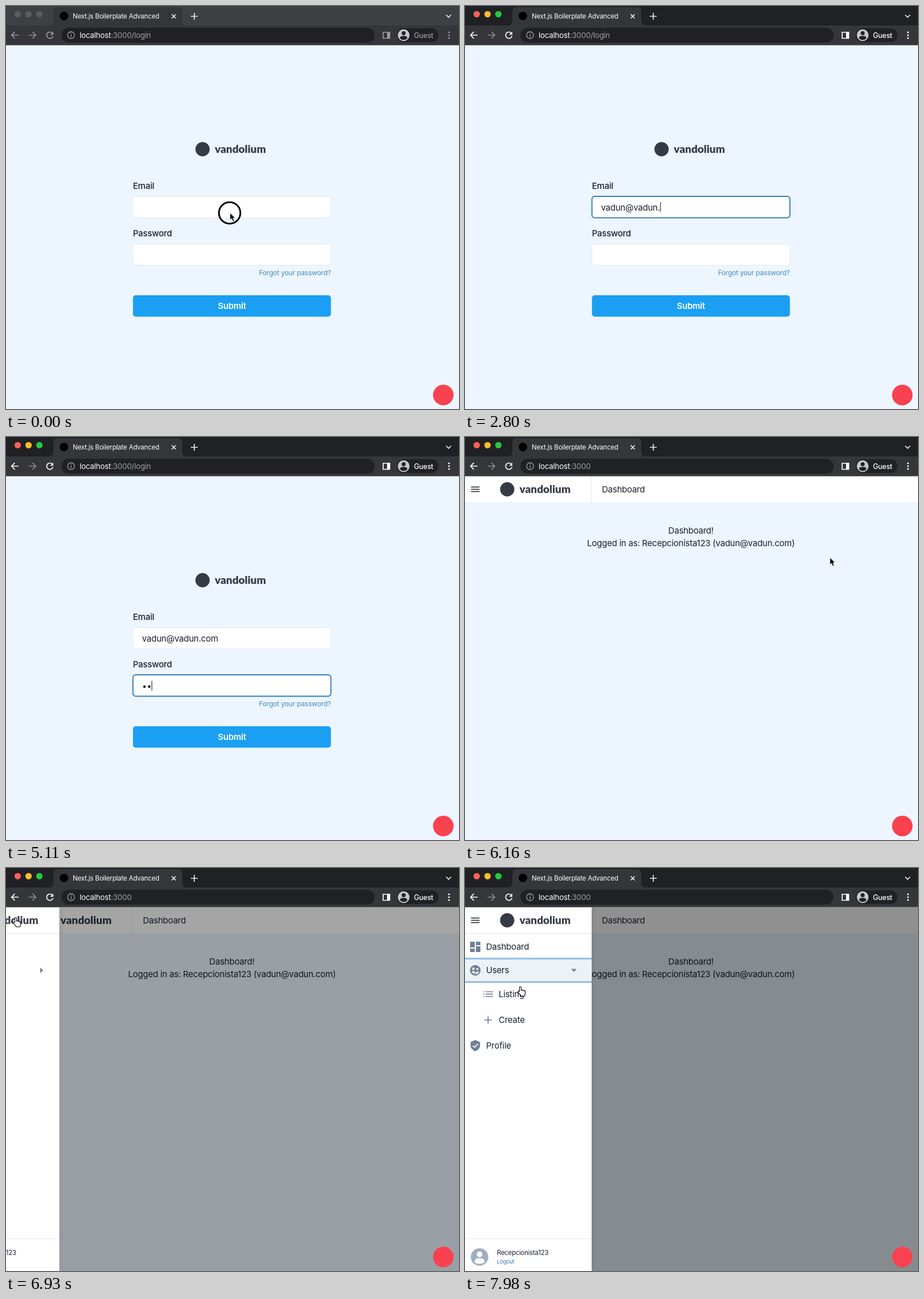
Recreate the animation shown at these times as an HTML page. Size 794 by 705 pixels, loop 8000 ms.

```html
<!DOCTYPE html>
<html lang="en">
<head>
<meta charset="utf-8">
<title>Login demo</title>
<style>
html, body { margin: 0; width: 100%; height: 100%; overflow: hidden; background: #edf5ff; }
svg { display: block; }
text { font-family: Inter, sans-serif; font-size: 15px; letter-spacing: -.016em; fill: #1a202c; white-space: pre; }
.label { font-weight: 500; }
.brand { font: 900 19px Lato, sans-serif; letter-spacing: 0; fill: #343b47; }
.line { fill: none; stroke: currentColor; stroke-width: 1.7; }
.rule { stroke: #e2e8f0; }
.field { fill: #fff; stroke: #e2e8f0; }
.focus { fill: none; stroke: #3480bd; stroke-width: 2; }
.icon { fill: #718096; }
</style>
</head>
<body>
<svg width="794" height="705" viewBox="0 0 794 705">
  <defs>
    <g id="logo">
      <circle cx="12.5" r="12.5" fill="#343b47"/>
      <text class="brand" x="34" y="6.5">vandolium</text>
    </g>
    <path id="burger" d="M10.5 87.5H25.5M10.5 91.5H25.5M10.5 95.5H25.5" stroke="#1a202c" stroke-width="1.6"/>
    <filter id="shadow" x="-20%" width="150%"><feDropShadow dx="1" dy="0" stdDeviation="5" flood-opacity=".12"/></filter>
    <clipPath id="subClip"><rect id="subRect" y="200" width="222" height="0"/></clipPath>
    <clipPath id="pageClip"><rect y="69" width="794" height="636"/></clipPath>
  </defs>
  <rect width="794" height="705" fill="#edf5ff"/>

  <g id="login">
    <g id="upper">
      <use href="#logo" x="332" y="250.5"/>
      <text class="label" x="222.5" y="319.5">Email</text>
      <rect class="field" x="222.5" y="333.5" width="347" height="37" rx="5"/>
      <rect id="emailFocus" class="focus" x="222.5" y="333" width="347" height="37.5" rx="5"/>
      <text id="email" x="238.5" y="357.5"></text>
      <text class="label" x="222.5" y="402.5">Password</text>
      <rect class="field" x="222.5" y="416.5" width="347" height="37" rx="5"/>
      <rect id="passFocus" class="focus" x="222.5" y="416" width="347" height="37.5" rx="5"/>
      <text id="pass" x="238.5" y="440.5"></text>
      <rect id="caret" width="1" height="17" fill="#111"/>
    </g>
    <text id="error" x="222.5" y="465.5" style="font-size:13px;fill:#d03c58">password is a required field</text>
    <g id="lower">
      <text x="569.5" y="470.5" text-anchor="end" style="font-size:12px;fill:#3d8dc0">Forgot your password?</text>
      <rect id="button" x="222.5" y="506" width="347" height="37.5" rx="5" fill="#1a9ff3"/>
      <text x="396" y="529.7" text-anchor="middle" style="font-weight:600;fill:#fff">Submit</text>
    </g>
  </g>

  <g id="home">
    <rect y="69" width="794" height="45" fill="#fff"/>
    <path id="hover" d="M0 69.5H36Q40.5 69.5 40.5 74V110Q40.5 114.5 36 114.5H0" fill="none" stroke="#dde2e8"/>
    <path class="rule" d="M221.5 69V114"/>
    <use href="#burger"/>
    <use href="#logo" x="61.5" y="91.5"/>
    <text x="240" y="97">Dashboard</text>
    <text x="396" y="168.7" text-anchor="middle">Dashboard!</text>
    <text x="396" y="191.4" text-anchor="middle">Logged in as: Recepcionista123 (vadun@vadun.com)</text>
  </g>
  <rect id="overlay" y="69" width="794" height="636"/>

  <g clip-path="url(#pageClip)">
  <g id="drawer">
    <rect y="69" width="222" height="636" fill="#fff" filter="url(#shadow)"/>
    <path class="rule" d="M0 114.5H222M0 648.5H222"/>
    <use href="#burger"/>
    <rect id="burgerFocus" x="-6" y="68" width="47.5" height="47" rx="6" fill="none" stroke="#90bfe5" stroke-width="3"/>
    <use href="#logo" x="61.5" y="91.5"/>
    <path class="icon" d="M9 129h8v10H9zM9 141h8v6H9zM19 129h8v6h-8zM19 137h8v10h-8z"/>
    <text x="37" y="143.3">Dashboard</text>
    <g id="userHover">
      <rect y="158" width="222" height="42" fill="#edf2f7"/>
      <path id="userFocus" d="M0 158.5H222M0 199.5H222" stroke="#90c0e6" stroke-width="3"/>
    </g>
    <circle class="icon" cx="18" cy="179" r="9.3"/>
    <path d="M11.5 181.5q3.2-2.2 6 0v4q-4-1-6-4zM18.8 183q2.8-3 5.8-1.5q-1.5 3.5-5.8 4.5z" fill="#fff"/>
    <circle cx="14.8" cy="176.3" r="2.2" fill="#fff"/><circle cx="21.5" cy="176.8" r="1.8" fill="#fff"/>
    <text x="37" y="184">Users</text>
    <path id="arrow" class="icon" d="M-2.5-4.8L2.8 0L-2.5 4.8z"/>
    <g clip-path="url(#subClip)">
      <path d="M32 216.5h2M32 220.7h2M32 225h2M36 216.5h13M36 220.7h13M36 225h13M34 266h13M40.5 259.5v13" stroke="#718096" stroke-width="1.7"/>
      <text x="59" y="226">Listing</text>
      <text x="59" y="271.3">Create</text>
    </g>
    <g id="profile">
      <path class="icon" d="M18 211l8.3 3.6v5.6q0 7-8.3 10.3q-8.3-3.3-8.3-10.3v-5.6z"/>
      <path d="M13.8 220.8l3 3l5.6-6" fill="none" stroke="#fff" stroke-width="1.8"/>
      <text x="37" y="226">Profile</text>
    </g>
    <circle cx="25.5" cy="680.5" r="15.3" fill="#a0aec0"/>
    <path d="M16.5 689.5q0-7 9-7t9 7q-3.5 3-9 3t-9-3z" fill="#fff"/>
    <circle cx="25.5" cy="675.8" r="5" fill="#fff"/>
    <text x="56" y="677" style="font-size:11.3px">Recepcionista123</text>
    <text x="56" y="692" style="font-size:9.5px;fill:#3577b0">Logout</text>
  </g>
  </g>
  <circle cx="766.5" cy="680.5" r="18" fill="#f9414f"/>

  <g id="chrome">
    <rect id="strip" width="794" height="34"/>
    <path d="M75 34q8 0 8-8V10q0-8 8-8H301q8 0 8 8V26q0 8 8 8H794V68H0V34z" fill="#35363a"/>
    <rect y="68" width="794" height="1" fill="#7c7d82"/>
    <g id="lights"></g>
    <circle cx="101.5" cy="17.5" r="7.5"/>
    <text x="117" y="22" style="font-size:11.5px;fill:#fff">Next.js Boilerplate Advanced</text>
    <g color="#e8e9eb">
      <path class="line" d="M290.5 14.5l7 7M297.5 14.5l-7 7M324 18h12M330 12v12M771.5 15.5l4.3 4.3l4.3-4.3"/>
    </g>
    <rect x="97" y="38" width="549" height="26" rx="13" fill="#202124"/>
    <g color="#9aa0a6">
      <circle class="line" cx="114" cy="51" r="6" style="stroke-width:1.3"/>
      <path class="line" d="M114 50v4.5M114 47.3v1.5" style="stroke-width:1.4"/>
    </g>
    <text x="129" y="55.6" style="font-size:13.3px;fill:#fff">localhost<tspan id="path" fill="#9aa0a6"></tspan></text>
    <path class="line" color="#8c8d91" d="M40 51H52M46.5 45.2l5.7 5.8l-5.7 5.8"/>
    <rect x="685" y="39" width="73" height="24" rx="12" fill="#202124"/>
    <circle cx="697" cy="51" r="10.3" fill="#c3c8cf"/>
    <path d="M690.5 56.5q0-4.3 6.5-4.3t6.5 4.3q-2.5 2.8-6.5 2.8t-6.5-2.8z" fill="#202124"/>
    <circle cx="697" cy="47.5" r="3.5" fill="#202124"/>
    <path class="line" d="M22 51H10M15.5 45.2L9.8 51l5.7 5.8M81.5 47.8a5.6 5.6 0 1 0 .9 4.6M661 46h11.5v10.5H661z"/>
    <path d="M82.9 44.7v5.5h-5.5zM668 45.5h5v11.5h-5z" fill="currentColor"/>
    <g fill="currentColor"><circle cx="776.5" cy="46" r="1.5"/><circle cx="776.5" cy="51" r="1.5"/><circle cx="776.5" cy="56" r="1.5"/></g>
    <text x="715" y="55.7" style="font-size:12.4px;font-weight:500;fill:currentColor">Guest</text>
  </g>

  <circle id="ring" cx="392" cy="362" r="18.8" fill="none" stroke="#000" stroke-width="3"/>
  <g id="cursor">
    <path id="pointer" d="M-.3 0V12.4L2.6 9.8L4.8 15L7.2 14L5 9H8.7z" stroke="#fff" stroke-width=".8"/>
    <path id="beam" d="M-2.5-7Q0-7 0-5Q0-7 2.5-7M0-5V6M-2.5 8Q0 8 0 6Q0 8 2.5 8" fill="none" stroke="#222" stroke-width="1.2"/>
    <path id="hand" d="M-1.5 8V1a1.5 1.5 0 0 1 3 0V6.5c0-1.5 2.5-1.5 2.6 0c.3-1 2.3-.8 2.5.5c.4-.9 2-.6 2 .8V11c0 2.5-1 3-1.2 5H1C0 13-3 11.5-4.2 9c-.8-1.5 1-2.3 2-1.5z" fill="#fff" stroke="#000" stroke-width="1.1"/>
  </g>
</svg>
<script>
const LOOP = 8000, STEP = 70;
const EMAIL = 'vadun@vadun.com';
const EMAIL_KEYS = [700, 770, 1260, 1400, 1540, 1610, 2240, 2310, 2380, 2520, 2590, 2800, 2940, 3010, 3080];
const PASS_KEYS = [5040, 5110, 5320, 5390];
const REJECTED = 3290, CORRECTED = 5110, SIGNED_IN = 5530, OPENED = 6838, USERS_CLICK = 7490;
const ROUTE = [[6160, 640, 211], [6300, 530, 130], [6440, 310, 52], [6580, 100, 26], [6720, 26, 68], [6790, 17, 87],
  [6930, 17, 87], [7000, 20, 93], [7280, 20, 93], [7420, 75, 152], [7490, 95, 172], [7770, 97, 176], [7980, 97, 208]];

const $ = id => document.getElementById(id);
const show = (id, on) => $(id).style.display = on ? '' : 'none';
const fade = (id, alpha) => $(id).setAttribute('opacity', alpha);
const move = (id, x, y, extra = '') => $(id).setAttribute('transform', `translate(${x} ${y})${extra}`);
const ramp = (t, from, length) => Math.min(1, Math.max(0, (t - from) / length));
const easeOut = p => 1 - (1 - p) ** 2;
const typed = (keys, t) => keys.filter(k => k <= t).length;
const within = (t, from, to) => t >= from && t < to;

function cursorAt(t) {
  if (t < ROUTE[0][0]) return [393, 362];
  const i = ROUTE.findIndex(p => p[0] > t);
  if (i < 0) return ROUTE.at(-1).slice(1);
  const [t0, x0, y0] = ROUTE[i - 1], [t1, x1, y1] = ROUTE[i];
  const p = (t - t0) / (t1 - t0);
  return [x0 + (x1 - x0) * p, y0 + (y1 - y0) * p];
}

function drawChrome(t) {
  const active = t >= 70;
  $('chrome').setAttribute('color', active ? '#fff' : '#9b9c9f');
  $('strip').setAttribute('fill', active ? '#202124' : '#3f4043');
  const colors = active ? ['#ff5f57', '#febc2e', '#28c840'] : Array(3).fill('#5c5d60');
  $('lights').innerHTML = colors.map((c, i) => `<circle cx="${20.5 + 19 * i}" cy="14.3" r="5.6" fill="${c}"/>`).join('');
  $('path').textContent = t < SIGNED_IN ? ':3000/login' : ':3000';
}

function drawLogin(t) {
  const shifted = within(t, REJECTED, CORRECTED), onPass = t >= REJECTED;
  const swap = ramp(t, REJECTED - 50, 200);
  move('upper', 0, shifted ? -8.5 : 0);
  move('lower', 0, shifted ? 7.5 : 0);
  show('error', shifted);
  $('email').textContent = EMAIL.slice(0, typed(EMAIL_KEYS, t));
  $('pass').textContent = '•'.repeat(typed(PASS_KEYS, t));
  fade('emailFocus', ramp(t, 70, 200) - swap);
  fade('passFocus', swap);
  $('button').setAttribute('fill', t >= 5460 ? '#1a90dc' : '#1a9ff3');
  const blink = within(t, 2170, 2240) || within(t, 3850, 4340) || within(t, 4900, 5040);
  show('caret', t >= 140 && !blink);
  const end = 238.8 + $(onPass ? 'pass' : 'email').getComputedTextLength();
  move('caret', end, onPass ? 426.5 : 343);
}

function drawHome(t) {
  show('hover', t >= 6790);
  fade('overlay', .435 * easeOut(ramp(t, 6816, 200)));
  const s = Math.max(0, t - OPENED) / 64;
  show('drawer', s > 0);
  move('drawer', -222 * (1 + s) * Math.exp(-s), 0);
  const open = easeOut(ramp(t, USERS_CLICK, 280));
  fade('burgerFocus', 1 - ramp(t, USERS_CLICK, 140));
  show('userHover', t >= 7420);
  fade('userFocus', ramp(t, USERS_CLICK, 200));
  move('arrow', 191, 179, ` rotate(${90 * open})`);
  $('subRect').setAttribute('height', 90 * open);
  move('profile', 0, 90 * open);
}

function drawCursor(t) {
  fade('ring', 1 - ramp(t, 0, 490));
  show('cursor', t < 560 || t >= ROUTE[0][0]);
  move('cursor', ...cursorAt(t));
  const beam = within(t, 140, 560), hand = t >= 6930;
  show('beam', beam);
  show('hand', hand);
  show('pointer', !beam && !hand);
}

function frame() {
  const t = Math.floor(performance.now() % LOOP / STEP) * STEP;
  show('login', t < SIGNED_IN);
  show('home', t >= SIGNED_IN);
  drawChrome(t);
  if (t < SIGNED_IN) drawLogin(t);
  drawHome(t);
  drawCursor(t);
  requestAnimationFrame(frame);
}
frame();
</script>
</body>
</html>
```
